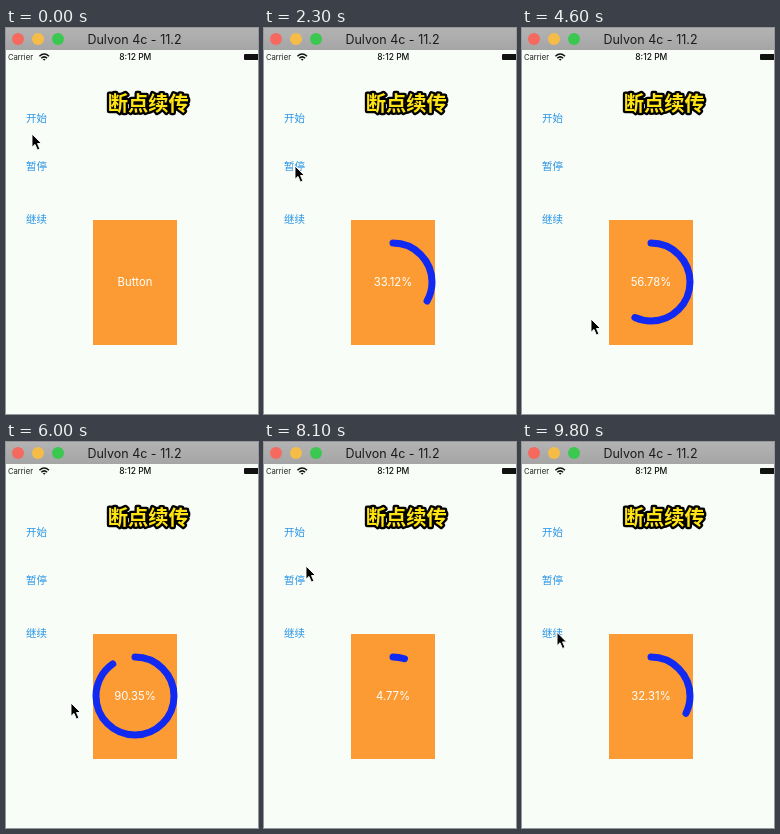
Animation, 252 px wide and 386 px high, one loop 9.9 s. Source, as an HTML page:

```html
<!DOCTYPE html>
<html lang="zh-CN">
<head>
<meta charset="utf-8">
<title>断点续传</title>
<style>
  html, body { margin: 0; width: 100%; height: 100%; overflow: hidden; background: #f8fdf8; }
  svg { display: block; width: 252px; height: 386px; }
  text { font-family: Inter, Roboto, sans-serif; text-anchor: middle; }
  .cjk { font-family: "Noto Sans CJK SC", "Noto Sans CJK", sans-serif; }
  .action { font-size: 10.5px; fill: #2b95e6; }
  .pressed { opacity: .22; }
  .banner { font-size: 20.3px; font-weight: 700; fill: #ffe312; stroke: #000; stroke-width: 4.6px; stroke-linejoin: round; paint-order: stroke; }
</style>
</head>
<body>
<svg viewBox="0 0 252 386">
  <defs>
    <linearGradient id="bar" x2="0" y2="1">
      <stop offset="0" stop-color="#b3b3b3"/>
      <stop offset="1" stop-color="#a5a5a5"/>
    </linearGradient>
  </defs>
  <rect width="252" height="386" fill="#f8fdf8"/>

  <rect width="252" height="22" fill="url(#bar)"/>
  <circle cx="12" cy="11" r="6" fill="#f5695f"/>
  <circle cx="32" cy="11" r="6" fill="#f5bd48"/>
  <circle cx="52" cy="11" r="6" fill="#3ac850"/>
  <text x="128.5" y="15.6" font-size="12.5" fill="#1c1c1c">Dulvon 4c - 11.2</text>

  <text x="14.5" y="32" font-size="7.7" fill="#222">Carrier</text>
  <g fill="none" stroke="#111" stroke-width="1.5">
    <path d="M33.4 28.2Q38.2 23.8 43 28.2M35.3 30.2Q38.2 27.5 41.1 30.2"/>
    <path d="M36.8 31.2Q38.2 30.2 39.6 31.2L38.2 32.8Z" fill="#111" stroke="none"/>
  </g>
  <text x="129.3" y="32" font-size="8.5" font-weight="500" fill="#111">8:12 PM</text>
  <rect x="238" y="26" width="16" height="6" rx="1" fill="#111"/>

  <text class="cjk banner" x="142.2" y="82.5">断点续传</text>

  <text class="cjk action" id="start" x="30.5" y="94">开始</text>
  <text class="cjk action" id="pause" x="30.5" y="142">暂停</text>
  <text class="cjk action" id="resume" x="30.5" y="195">继续</text>

  <rect x="87" y="192" width="84" height="125" fill="#fc9b33"/>
  <circle id="ring" cx="129" cy="254" r="39" pathLength="100" transform="rotate(-90 129 254)"
    fill="none" stroke="#1229f2" stroke-width="7" stroke-linecap="round"/>
  <text id="label" x="129" y="258" font-size="11.3" fill="#fff">Button</text>

  <path id="cursor" d="M0 0V13.2L3 10.4L5.4 16L7.9 15L5.5 9.5H9.5Z" fill="#000" stroke="#fff" stroke-width=".9"/>
</svg>
<script>
const LOOP = 9900, STEP = 100, PRESS = 200;
const $ = id => document.getElementById(id);
const ring = $('ring'), label = $('label'), cursor = $('cursor');

// Each stretch of downloading: when it begins, and the percent it runs between.
const downloads = [
  { at: 1076.4, from: 0, to: 34.54 },
  { at: 3800, from: 34.54, to: 100 },
  { at: 7935, from: 0, to: 32.31 }
];

const presses = { start: [1000, 7800], pause: [2400, 9100], resume: [3700] };

// Places the pointer passes: [time, x, y]
const stops = [
  [0, 26, 106], [1000, 30, 89], [2300, 31, 138], [3800, 37, 193], [4600, 69, 291],
  [6000, 65, 261], [7800, 34, 90], [8100, 42, 124], [LOOP, 35, 191]
];

// The speed drops slightly as a download goes on.
function percentAt(t) {
  const run = downloads.filter(d => d.at <= t).pop();
  if (!run) return 0;
  const s = (t - run.at) / 1000;
  return Math.min(run.to, run.from + 29.19 * s - 1.737 * s * s);
}

function pointerAt(t) {
  const i = stops.findIndex(stop => stop[0] > t);
  const [t0, x0, y0] = stops[i - 1], [t1, x1, y1] = stops[i];
  const u = (t - t0) / (t1 - t0), k = u * u * (3 - 2 * u);
  return [x0 + (x1 - x0) * k, y0 + (y1 - y0) * k];
}

function draw(t) {
  const percent = percentAt(t);
  ring.style.display = percent ? '' : 'none';
  ring.setAttribute('stroke-dasharray', `${percent} 200`);
  label.textContent = percent ? percent.toFixed(2) + '%' : 'Button';

  cursor.setAttribute('transform', `translate(${pointerAt(t)})`);

  for (const [id, times] of Object.entries(presses)) {
    $(id).classList.toggle('pressed', times.some(at => t >= at && t < at + PRESS));
  }
}

const origin = performance.now();
function tick() {
  const t = (performance.now() - origin) % LOOP;
  draw(Math.floor(t / STEP) * STEP);
  requestAnimationFrame(tick);
}
tick();
</script>
</body>
</html>
```
